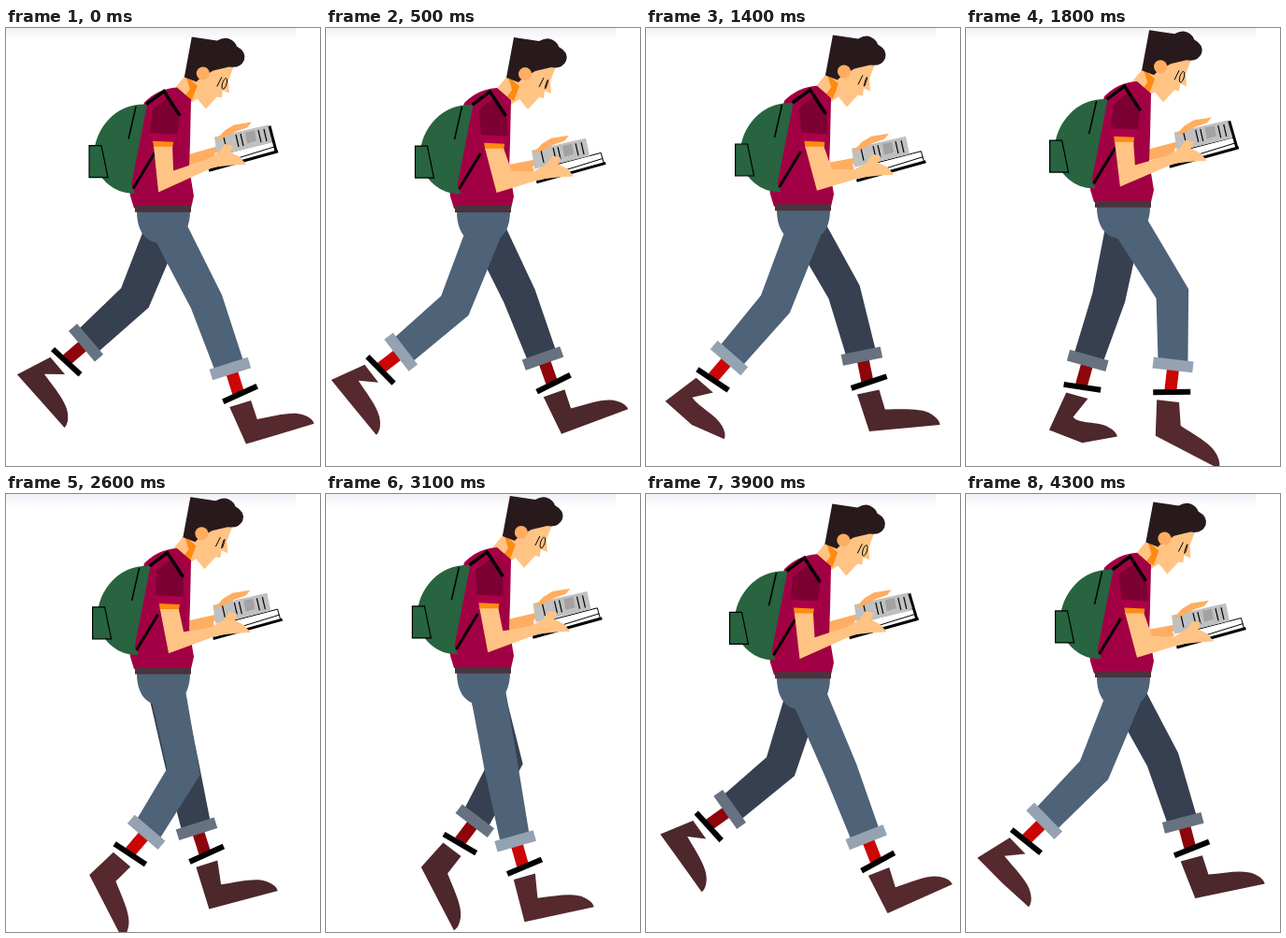
An HTML page with a canvas that plays this animation: 336 px wide and 468 px high, repeating every 4.4 s.

```html
<!DOCTYPE html>
<html lang="en">
<head>
<meta charset="utf-8">
<title>Walking reader</title>
<style>
  html, body { margin: 0; width: 100%; height: 100%; overflow: hidden; background: #fff; }
  canvas { display: block; width: 336px; height: 468px; }
</style>
</head>
<body>
<canvas id="stage" width="336" height="468"></canvas>
<script>
const ctx = document.getElementById('stage').getContext('2d');
const TAU = 2 * Math.PI;
const LOOP = 4400, STEP = 100, STRIDE = 960;
const SKIN = '#ffc384', SHADE = '#ffad62', ORANGE = '#ff8b12', INK = '#000';
const SHIRT = '#a20044', HAIR = '#281a1c';

const nearLook = { cloth: '#4e6278', cuff: '#94a2b2', sock: '#cc0505', boot: '#55292d', hip: 172, thigh: 93, shin: 76 };
const farLook = { cloth: '#364050', cuff: '#667280', sock: '#8c060b', boot: '#4c272b', hip: 170, thigh: 85, shin: 71 };

// Periodic motion: a mean plus [cosine, sine] pairs for rising harmonics
function wave(u, mean, ...pairs) {
  return pairs.reduce((sum, [c, s], i) => {
    const a = TAU * (i + 1) * u;
    return sum + c * Math.cos(a) + s * Math.sin(a);
  }, mean);
}

// Angles in degrees over one stride that starts at heel strike
const thighAngle = u => wave(u, -8, [-24.7, 6], [5.5, 2]);
const shinAngle = u => wave(u, 11, [-31.2, -16], [3, 2], [-2.3, 0.5]);
const cuffAngle = u => shinAngle(u) + wave(u, 2, [0, -7]);
const soleAngle = u => wave(u, 21, [-29.5, -33], [-5.2, -3.2], [-3, 2]);
const toeBend = u => -33 * Math.exp(-Math.pow((u - Math.floor(u) - 0.405) / 0.06, 4));

function trace(points) {
  ctx.beginPath();
  points.forEach(p => ctx.lineTo(p[0], p[1]));
}
function poly(color, ...points) {
  trace(points);
  ctx.fillStyle = color;
  ctx.fill();
}
function line(width, ...points) {
  trace(points);
  ctx.lineWidth = width;
  ctx.strokeStyle = INK;
  ctx.stroke();
}
function shape(color, d) {
  ctx.fillStyle = color;
  ctx.fill(new Path2D(d));
}
function shifted(x, y, draw) {
  ctx.save();
  ctx.translate(x, y);
  draw();
  ctx.restore();
}
// Maps local points of a turned part to the stage
function frame([x, y], degrees) {
  const a = degrees * Math.PI / 180, c = Math.cos(a), s = Math.sin(a);
  return (px, py) => [x + px * c - py * s, y + px * s + py * c];
}
const offset = (dx, dy) => (x, y) => [x + dx, y + dy];
const bar = (color, at, w, h) => poly(color, at(-w, -h), at(w, -h), at(w, h), at(-w, h));

function drawBoot(look, ankle, u) {
  const heel = ankle(wave(u, -15, [7, 0]), wave(u, 80, [2, 5.5]));
  const sole = frame(heel, soleAngle(u));
  const ball = sole(38, 0);
  const toe = frame(ball, soleAngle(u) + toeBend(u));
  ctx.beginPath();
  ctx.moveTo(...heel);
  ctx.lineTo(...ankle(-13, 39));
  ctx.lineTo(...ankle(11, 39));
  ctx.lineTo(...sole(19, -22));
  ctx.bezierCurveTo(...toe(0, -20), ...toe(20, -20), ...toe(30, -12));
  ctx.quadraticCurveTo(...toe(38, -6), ...toe(38, 0));
  ctx.lineTo(...ball);
  ctx.fillStyle = look.boot;
  ctx.fill();
}

function drawLeg(look, u, drop) {
  const swing = thighAngle(u), lower = shinAngle(u);
  const hip = frame([look.hip, 210 + drop], swing);
  const kneeAt = hip(0, look.thigh);
  const knee = frame(kneeAt, (swing + lower) / 2);
  const ankle = frame(frame(kneeAt, lower)(0, look.shin), cuffAngle(u));
  poly(look.sock, ankle(-6, 2), ankle(7, 2), ankle(7, 27), ankle(-6, 27));
  drawBoot(look, ankle, u);
  bar(INK, frame(ankle(2, 29), cuffAngle(u) - 7), 20, 3);
  poly(look.cloth, hip(19, 0), knee(18, 0), ankle(16, 0), ankle(-16, 0), knee(-18, 0), hip(-19, 0));
  bar(look.cuff, ankle, 21.5, 6);
}

function drawHead(squint) {
  poly(SKIN, [193, 50], [222, 40], [244, 41], [238, 57], [239, 70], [232, 67], [231, 75], [226, 74], [214, 87],
    [205, 76], [196, 82], [180, 66]);
  poly(ORANGE, [193, 52], [205, 62], [199, 78], [192, 73], [197, 66]);
  shape(HAIR, 'M199 10L226 14Q235 9 241 13Q246 16 247 20Q258 26 255 35Q251 44 239 42L222 46L208 54L204 58L191 53Z');
  ctx.fillStyle = SHADE;
  ctx.beginPath();
  ctx.ellipse(211, 49, 7, 7, 0, 0, TAU);
  ctx.fill();
  line(1, [226, 63], [231, 53]);
  ctx.beginPath();
  ctx.ellipse(234, 60, squint ? 0.6 : 2.2, squint ? 5 : 6, 0.3, 0, TAU);
  ctx.stroke();
}

function drawBag() {
  shape('#27643f', 'M151 82Q126 81 110 98Q95 114 94 136Q96 157 110 168Q122 178 138 177L134 168Z');
  trace([[89, 126], [102, 126], [109, 160], [89, 160]]);
  ctx.closePath();
  ctx.fill();
  ctx.lineWidth = 1.2;
  ctx.strokeStyle = INK;
  ctx.stroke();
  line(1.5, [139, 84], [131, 119]);
  line(3, [159, 134], [136, 172]);
}

function drawBook(sway, book, page) {
  poly('#fff', page(224, 134), book(286, 121), book(290, 131), book(218, 151));
  line(1, book(220, 148), book(288, 127));
  line(1, book(228, 136), book(219, 139), book(218, 151));
  line(1, book(228, 136), book(286, 121), book(289, 132));
  line(3, book(217, 152.5), book(291, 132));
  poly('#c0c0c0', page(223, 117), page(281, 104), page(285, 123), page(226, 137));
  poly('#a2a2a2', page(256, 112), page(266, 110), page(268, 121), page(258, 124));
  for (const x of [233, 246, 251, 270, 276]) {
    const y = 117 - (x - 233) * 0.2;
    line(1.2, page(x, y), page(x + 3, y + 13));
  }
  if (sway < 5) line(3, page(282, 105), book(289, 132));
  poly(SHADE, page(224, 121), page(234, 110), page(244, 104), page(263, 101), page(258, 107), page(246, 111), page(235, 117));
}

function drawFigure(phase) {
  const lift = -4.2 + 4.6 * Math.cos(2 * TAU * (phase - 0.05));
  const sway = 10 - 10 * Math.cos(TAU * (phase + 0.025));
  const squint = Math.cos(TAU * (phase - 0.6)) > 0.6;
  const drop = lift * 0.75;
  const bagX = sway * 0.33, bagY = lift * 0.85;
  const strap = offset(bagX, bagY);
  const arm = offset(sway * 0.62, lift * 0.8 + sway * 0.08);
  const elbow = offset(sway, lift * 0.95);
  const book = offset(sway * 0.42, lift * 0.8 + sway * 0.63);
  const page = offset(sway * -0.15, lift + sway * 0.7);
  const farElbow = offset(0, lift + sway * 0.5);

  drawLeg(farLook, phase + 0.5, drop);
  drawLeg(nearLook, phase, drop);
  shifted(0, drop, () => shape(nearLook.cloth, 'M140 196H197Q197 207 193 216Q186 228 168 230C150 231 140 218 140 196Z'));
  poly(SHADE, farElbow(190, 137), page(226, 127), book(225, 139), farElbow(190, 149));
  shifted(sway * 0.1 + lift * 0.45, lift * 1.12, () => drawHead(squint));
  shifted(0, lift, () => shape(SHIRT,
    'M183 64L198 77L197 122L196 150L201 180L198 193H137L133 180L129 150L148 80Q163 65 183 64Z'));
  shifted(0, drop, () => poly('#49343d', [138, 190], [198, 190], [198, 197], [138, 197]));
  shifted(bagX, bagY, drawBag);

  poly('#7d0033', strap(157, 87), strap(172, 76), strap(186, 93), arm(183, 114), arm(154, 112));
  line(3.5, strap(150, 82), strap(169, 68), strap(186, 94));
  poly('#ad0048', arm(152, 113), arm(183, 114), arm(180, 122), arm(157, 121));
  poly(ORANGE, arm(157, 121), arm(179, 122), arm(178, 129), arm(158, 128));

  drawBook(sway, book, page);
  poly(SKIN, arm(158, 127), arm(178, 127), elbow(179, 153), book(214, 141), book(228, 133), book(234, 124),
    book(243, 126), book(240, 133), book(250, 138), book(257, 146), book(240, 147), book(222, 149), elbow(163, 176));
}

const haze = ctx.createLinearGradient(0, 0, 0, 14);
haze.addColorStop(0, '#f1f0f7');
haze.addColorStop(1, '#ffffff');

function render(now) {
  const time = Math.floor((now % LOOP) / STEP) * STEP;
  ctx.fillStyle = '#fff';
  ctx.fillRect(0, 0, 336, 468);
  ctx.fillStyle = haze;
  ctx.fillRect(0, 0, 310, 14);
  drawFigure(time / STRIDE);
}

let start;
function tick(now) {
  start ??= now;
  render(now - start);
  requestAnimationFrame(tick);
}
render(0);
requestAnimationFrame(tick);
</script>
</body>
</html>
```
